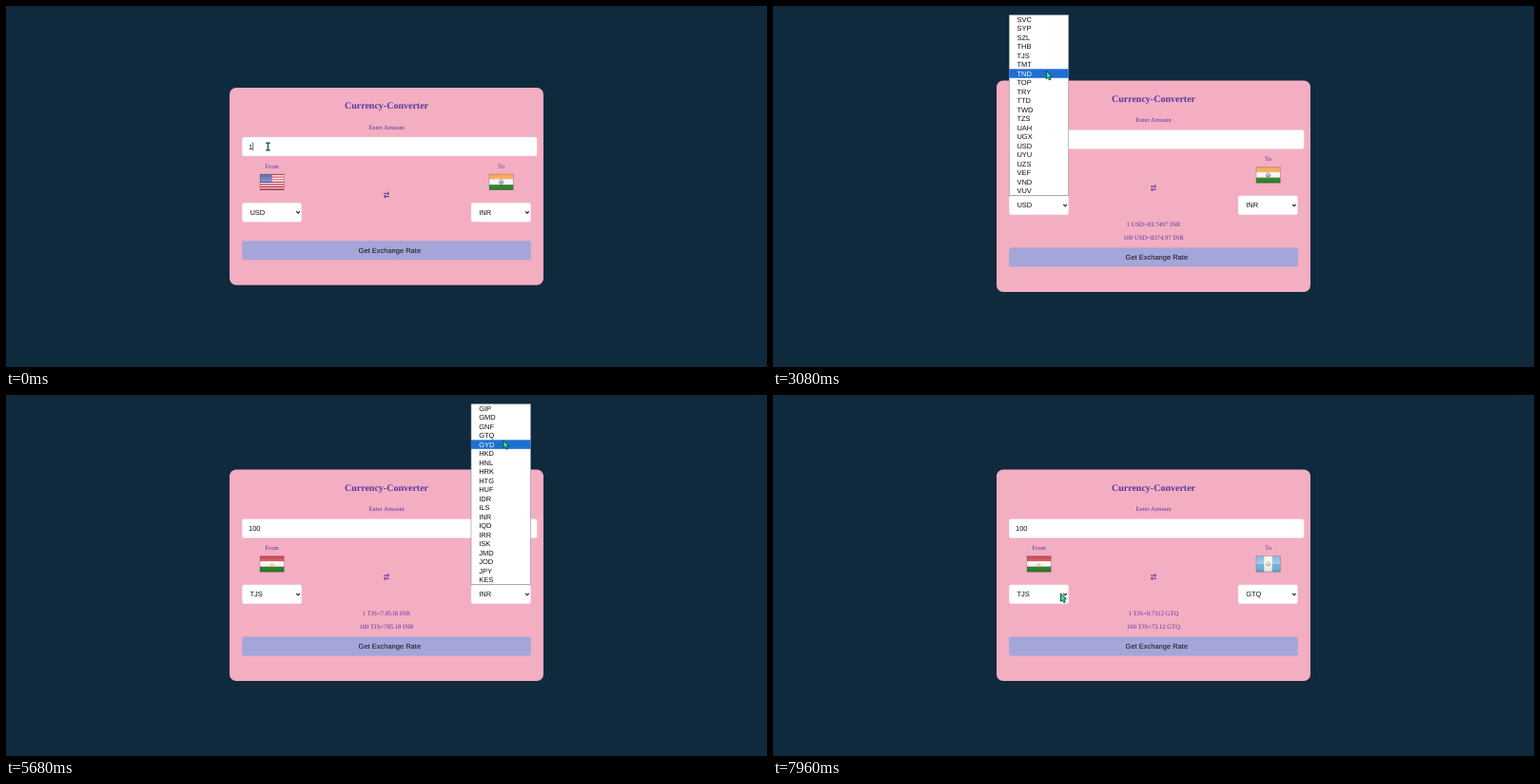
An HTML page for the animation above (8 s loop, 800 by 380 pixels).

```html
<!DOCTYPE html>
<html lang="en">
<head>
<meta charset="utf-8">
<title>Currency-Converter</title>
<style>
  html, body { margin: 0; width: 100%; height: 100%; overflow: hidden; background: #102a3d; }
  svg { display: block; width: 800px; height: 380px; }
  text { text-rendering: geometricPrecision; white-space: pre; }
  .serif { font: 6.667px "Liberation Serif", "Times New Roman", serif; fill: #5537a5; text-anchor: middle; }
  .title { font-size: 10px; font-weight: bold; }
  .sans { font: 7.5px "Liberation Sans", Arial, sans-serif; fill: #111; }
  .field { fill: #fff; stroke: #e6d3dc; stroke-width: .4; }
  .chevron { fill: none; stroke: #222; stroke-width: 1.1; }
  .cursor { fill: #35dfa8; stroke: #123c40; stroke-width: .9; stroke-linejoin: round; }
</style>
</head>
<body>
<svg viewBox="0 0 800 380">
  <defs>
    <linearGradient id="shine" x2="0" y2="1">
      <stop offset="0" stop-color="#fff" stop-opacity=".12"/>
      <stop offset=".5" stop-color="#fff" stop-opacity=".38"/>
      <stop offset=".51" stop-color="#fff" stop-opacity="0"/>
      <stop offset="1" stop-color="#000" stop-opacity=".15"/>
    </linearGradient>
  </defs>
  <rect width="800" height="380" fill="#102a3d"/>
  <rect id="card" x="235" width="330" rx="7" fill="#f4aec1"/>
  <g id="upper">
    <text class="serif title" x="400" y="108">Currency-Converter</text>
    <text class="serif" x="400" y="129.7">Enter Amount</text>
    <rect class="field" x="248.2" y="138" width="310" height="20" rx="2"/>
    <text class="sans" id="amount" x="255" y="150.6"></text>
    <rect id="caret" y="143.5" width=".7" height="8.5" fill="#222"/>
    <text class="serif" x="279.5" y="170.5">From</text>
    <text class="serif" x="520.5" y="170.5">To</text>
    <g id="flagFrom" transform="translate(267 177)"></g>
    <g id="flagTo" transform="translate(508 177)"></g>
    <path d="M397 197.3h5.2M400.8 195.6l1.9 1.7l-1.9 1.7M403 200.6h-5.2M399.2 198.9l-1.9 1.7l1.9 1.7"
      fill="none" stroke="#5030a0" stroke-width=".95"/>
    <g id="selects"></g>
  </g>
  <text class="serif" id="rate" x="400" y="232.1"></text>
  <text class="serif" id="total" x="400" y="246.4"></text>
  <g id="lower">
    <rect x="248.2" y="247.2" width="303.6" height="20" rx="2" fill="#a4a5d9" stroke="#b9abd6" stroke-width=".5"/>
    <text class="sans" x="370.6" y="259.6">Get Exchange Rate</text>
  </g>
  <g id="popup"></g>
  <g id="cursor" class="cursor">
    <path id="arrow" d="M0 0V8.3L1.9 6.8L3.3 9.6L4.8 8.8L3.5 6.1L5.9 5.6Z"/>
    <path id="hand" d="M-.8 .3Q0 -.7 .8 .3V3.5L3 4Q4 4.3 4 5.3L3.4 8.8H-1L-3 5.6Q-2.6 4.5 -1.6 5L-.8 5.8ZM1.6 5.5V7M2.7 5.6V7"/>
    <path id="beam" d="M-2.2 -3.8H2.2M0 -3.8V3.8M-2.2 3.8H2.2" fill="none" stroke="#14604f" stroke-width="1.4"/>
  </g>
</svg>
<script>
const LOOP = 8000, STEP = 40;
const $ = id => document.getElementById(id);
const rect = (x, y, w, h, fill) => `<rect x="${x}" y="${y}" width="${w}" height="${h}" fill="${fill}"/>`;
const W = 25.2, H = 16.6;

const bands = (...colors) => colors.map((c, i) => rect(0, i * H / 3, W, H / 3, c)).join("");
const columns = (...colors) => colors.map((c, i) => rect(i * W / 3, 0, W / 3, H, c)).join("");

function usFlag() {
  let s = "";
  for (let i = 0; i < 13; i++) s += rect(0, i * H / 13, W, H / 13, i % 2 ? "#f8f1f2" : "#c32a3c");
  s += rect(0, 0, 12.6, H * 7 / 13, "#3b4a9c");
  for (let r = 0; r < 4; r++)
    for (let c = 0; c < 6; c++) s += rect(1 + c * 1.95, 1 + r * 2, .6, .6, "#cbd0ea");
  return s;
}

const flags = {
  USD: usFlag(),
  INR: bands("#f7973a", "#f6f4f1", "#2d8a2b") +
    `<circle cx="12.6" cy="8.3" r="2" fill="#dfe2ef" stroke="#37478f" stroke-width=".8"/><circle cx="12.6" cy="8.3" r=".7" fill="#37478f"/>`,
  TJS: bands("#c4283a", "#f6f4f1", "#2c7f2c") +
    `<path d="M10.8 9.8V7.6l1 .9l.8 -1.4l.8 1.4l1 -.9v2.2z" fill="#e4c65c"/>`,
  GTQ: columns("#6fb2dc", "#f4f6f6", "#6fb2dc") +
    `<circle cx="12.6" cy="8.3" r="2" fill="#e3dfb0" stroke="#86a873" stroke-width=".9"/>`
};

const setFlag = (id, code) => {
  $(id).innerHTML = flags[code] +
    `<rect width="${W}" height="${H}" fill="url(#shine)" stroke="#5b4a50" stroke-opacity=".55" stroke-width=".5"/>`;
};

$("selects").innerHTML = [[248.2, "from"], [489, "to"]].map(([x, id]) =>
  `<rect class="field" x="${x}" y="207.2" width="62.6" height="20" rx="2"/>
   <text class="sans" id="${id}" x="${x + 8.2}" y="219.8"></text>
   <path class="chevron" d="M${x + 57} 216.2l1.9 1.9l1.9 -1.9"/>`).join("");

const lists = {
  from: { x: 248.2, codes: "SVC SYP SZL THB TJS TMT TND TOP TRY TTD TWD TZS UAH UGX USD UYU UZS VEF VND VUV".split(" "), start: "USD" },
  to: { x: 489, codes: "GIP GMD GNF GTQ GYD HKD HNL HRK HTG HUF IDR ILS INR IQD IRR ISK JMD JOD JPY KES".split(" "), start: "INR" }
};
const TOP = 9.3, ROW = 9.5;

function drawPopup(id, y) {
  if (!id) return "";
  const { x, codes, start } = lists[id];
  const row = Math.floor((y - TOP) / ROW);
  const active = row >= 0 && row < codes.length ? row : codes.indexOf(start);
  return `<rect x="${x}" y="${TOP}" width="62.6" height="190" fill="#fff" stroke="#777" stroke-width=".5"/>` +
    codes.map((c, i) => {
      const top = TOP + i * ROW, on = i === active;
      return (on ? rect(x, top, 62.6, ROW, "#1e6fd0") : "") +
        `<text class="sans" x="${x + 8.2}" y="${top + 7.4}"${on ? ' style="fill:#fff"' : ""}>${c}</text>`;
    }).join("");
}

// Each table: [start ms, value]
const steps = {
  amount: [[0, "1"], [480, "10"], [520, "100"]],
  caret: [[0, 1], [40, 0], [480, 1], [1040, 0]],
  open: [[0, 0], [2120, 1]],
  from: [[0, "USD"], [3280, "TJS"]],
  to: [[0, "INR"], [5840, "GTQ"]],
  flagFrom: [[0, "USD"], [3440, "TJS"]],
  flagTo: [[0, "INR"], [6360, "GTQ"]],
  rate: [[0, ""], [2120, "1 USD=83.7497 INR"], [4920, "1 TJS=7.8518 INR"], [7040, "1 TJS=0.7312 GTQ"]],
  total: [[0, ""], [2120, "100 USD=8374.97 INR"], [4920, "100 TJS=785.18 INR"], [7040, "100 TJS=73.12 GTQ"]],
  popup: [[0, ""], [2760, "from"], [3280, ""], [5320, "to"], [5840, ""]]
};

// Pointer: [ms, x, y]
const path = [
  [0, 275.4, 148], [640, 275.4, 148], [1480, 446, 266], [1720, 452, 255.2], [2320, 452, 255.2],
  [2560, 306.5, 209.5], [2760, 306.5, 209.5], [3160, 285, 52], [3280, 285, 52], [3520, 285, 98],
  [3600, 285, 98], [4000, 237, 292], [4200, 280, 294], [4600, 461, 259.2], [4880, 461, 259.2],
  [5200, 547, 209], [5360, 547, 209], [5720, 522, 42], [5840, 522, 42], [6160, 508, 113],
  [6240, 508, 113], [6520, 488, 250], [6720, 441, 264], [7440, 441, 264], [7800, 302.5, 209], [8000, 302.5, 209]
];

const at = (table, t) => table.filter(s => s[0] <= t).pop()[1];

function pointer(t) {
  const i = path.findIndex(p => p[0] > t), a = path[i - 1], b = path[i];
  const u = (t - a[0]) / (b[0] - a[0]), k = u * u * (3 - 2 * u);
  return [a[1] + (b[1] - a[1]) * k, a[2] + (b[2] - a[2]) * k];
}

const inside = (x, y, l, t, r, b) => x > l && x < r && y > t && y < b;
const shown = {};
const change = (id, value, apply) => {
  if (shown[id] !== value) apply(shown[id] = value);
};

function draw(t) {
  const now = {};
  for (const id in steps) now[id] = at(steps[id], t);
  const shift = now.open ? 7.4 : 0;
  $("card").setAttribute("y", 85.9 - shift);
  $("card").setAttribute("height", 207.8 + 2 * shift);
  $("upper").setAttribute("transform", `translate(0 ${-shift})`);
  $("lower").setAttribute("transform", `translate(0 ${shift})`);
  for (const id of ["amount", "from", "to", "rate", "total"])
    change(id, now[id], v => $(id).textContent = v);
  for (const id of ["flagFrom", "flagTo"]) change(id, now[id], v => setFlag(id, v));
  $("caret").setAttribute("x", 255.2 + now.amount.length * 4.17);
  $("caret").setAttribute("opacity", now.caret);

  const [x, y] = pointer(t);
  change("popup", drawPopup(now.popup, y), v => $("popup").innerHTML = v);
  let kind = "arrow";
  if (!now.popup) {
    if (inside(x, y, 248, 247 + shift, 552, 267.2 + shift)) kind = "hand";
    else if (inside(x, y, 248, 138 - shift, 558, 158 - shift)) kind = "beam";
  }
  for (const id of ["arrow", "hand", "beam"]) $(id).style.display = id === kind ? "" : "none";
  $("cursor").setAttribute("transform", `translate(${x} ${y})`);
}

const begin = performance.now();
function tick() {
  const t = (performance.now() - begin) % LOOP;
  draw(Math.floor(t / STEP) * STEP);
  requestAnimationFrame(tick);
}
tick();
</script>
</body>
</html>
```
